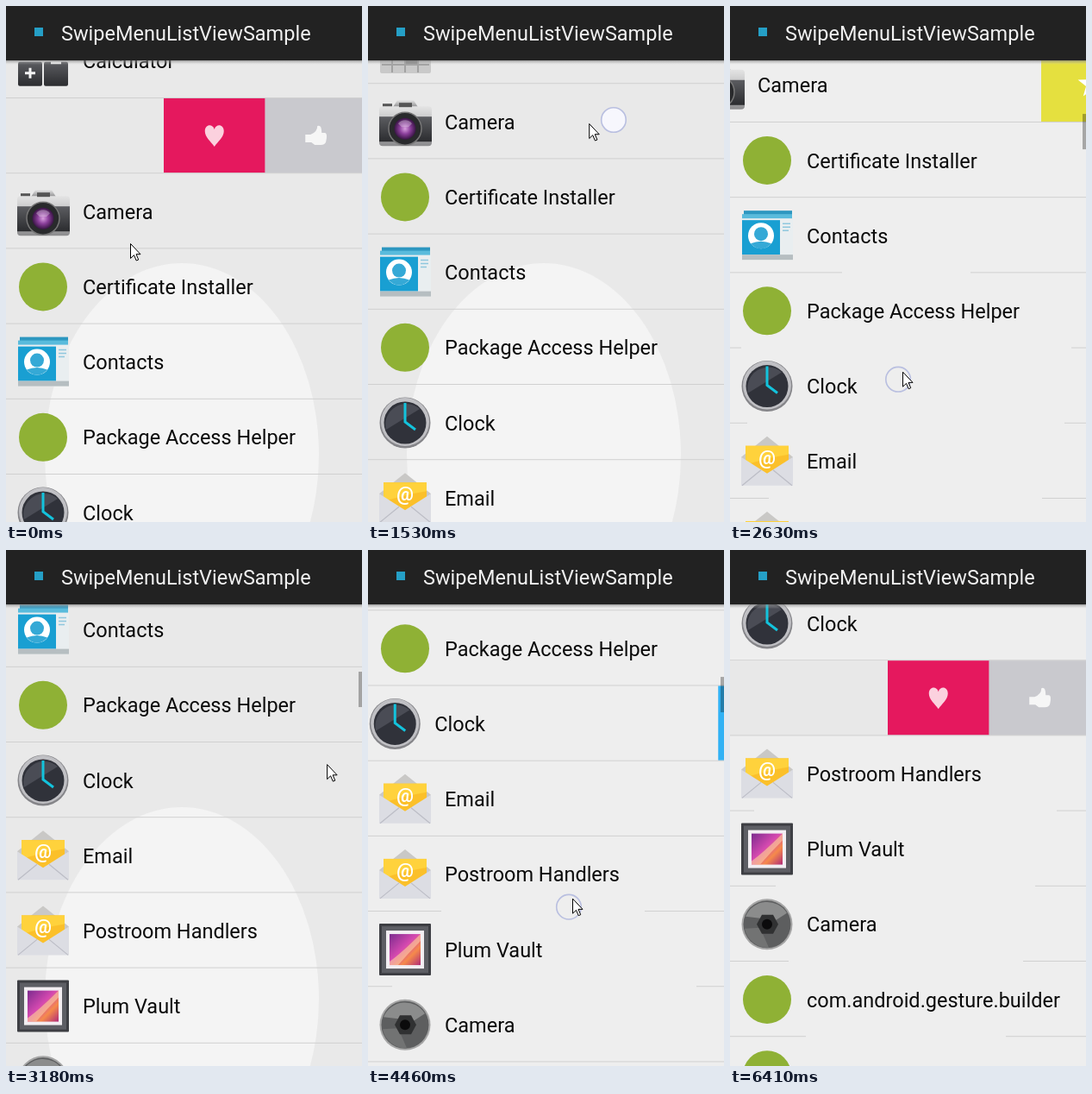
Recreate the animation shown at these times as an HTML page. Size 413 by 598 pixels, loop 7.7 s.

```html
<!DOCTYPE html>
<html lang="en">
<head>
<meta charset="utf-8">
<title>Swipe menu list</title>
<style>
html, body { margin: 0; width: 100%; height: 100%; overflow: hidden; background: #eee; }
svg { display: block; width: 413px; height: 598px; }
text { font-family: Roboto, "Open Sans", sans-serif; font-size: 23.5px; fill: #0b0b0b; }
</style>
</head>
<body>
<svg id="stage" viewBox="0 0 413 598">
  <defs>
    <linearGradient id="shade" x2="0" y2="1"><stop stop-color="#777" stop-opacity=".7"/><stop offset="1" stop-color="#ccc" stop-opacity="0"/></linearGradient>
    <linearGradient id="silver" x2="0" y2="1"><stop stop-color="#e4e4e4"/><stop offset="1" stop-color="#8c8c8e"/></linearGradient>
    <linearGradient id="dark" x2="0" y2="1"><stop stop-color="#5c5d61"/><stop offset="1" stop-color="#2b2c2f"/></linearGradient>
    <linearGradient id="paint" x2="1" y2="1"><stop stop-color="#7c2b8e"/><stop offset=".45" stop-color="#d549b0"/><stop offset=".7" stop-color="#f58a4b"/><stop offset="1" stop-color="#b02a78"/></linearGradient>
    <radialGradient id="violet"><stop stop-color="#d9a0e0"/><stop offset=".5" stop-color="#8b3f9b"/><stop offset="1" stop-color="#3a1546"/></radialGradient>
  </defs>
  <rect id="back" width="413" height="598"/>
  <ellipse id="glow" cx="204" cy="520" rx="159" ry="222" fill="#f4f4f4"/>
  <g id="list"></g>
  <rect id="bar" x="409" width="4" height="41" fill="#000"/>
  <rect y="63" width="413" height="5" fill="url(#shade)"/>
  <rect width="413" height="63" fill="#222"/>
  <rect x="33" y="25" width="10" height="10" fill="#259fc6"/>
  <text x="64" y="40" style="fill:#f1f1f1">SwipeMenuListViewSample</text>
  <circle id="touch" r="14.3" stroke="#b9bfe0" stroke-width="1.6"/>
  <path id="cursor" d="M.5.5V17.5L4.5 13.7 7.2 20 9.7 19 7 12.7H12Z" fill="#fff" stroke="#000"/>
</svg>
<script>
const LOOP = 7700, WIDTH = 418, ITEM = 117.5, OPEN = 2 * ITEM, PITCH = 87.2, TOP = 19.8;
const el = id => document.getElementById(id);

const rect = (x, y, w, h, fill, more = '') =>
  `<rect x="${x}" y="${y}" width="${w}" height="${h}" fill="${fill}" ${more}/>`;
const disc = (x, y, r, fill, more = '') => `<circle cx="${x}" cy="${y}" r="${r}" fill="${fill}" ${more}/>`;
const path = (d, fill, more = '') => `<path d="${d}" fill="${fill}" ${more}/>`;
const line = (d, stroke, width) => path(d, 'none', `stroke="${stroke}" stroke-width="${width}"`);

// App icons, centred on 0,0
const icons = {
  calculator: [[-29, -29], [1, -29], [-29, 1], [1, 1]]
    .map(([x, y]) => rect(x, y, 28, 28, 'url(#dark)', 'rx="2"')).join('') +
    line('M-21 14H-9M-15 8V20M9 2H21', '#f4f4f4', 3),
  calendar: rect(-29, -27, 59, 58, '#c9c9c9', 'rx="2"') + rect(-29, -27, 59, 15, '#4a9fc2') +
    line('M-27 -3H28M-27 9H28M-27 21H28M-15 -12V30M0 -12V30M15 -12V30', '#a2a2a2', 2) +
    rect(1, 10, 13, 10, '#8d8d8d'),
  camera: path('M-14 -17L-9 -25H10L15 -17Z', 'url(#silver)') + rect(-26, -21, 11, 5, '#555') +
    rect(-30, -18, 61, 46, 'url(#silver)', 'rx="4"') + rect(-30, -6, 61, 29, 'url(#dark)') +
    rect(-7, -22, 15, 5, '#555') + disc(0, 8, 19, '#292a2c', 'stroke="#777" stroke-width="1.5"') +
    disc(0, 8, 12.5, 'url(#violet)') + path('M-8 2A10 10 0 0 1 8 2L4 6H-4Z', '#fff', 'opacity=".3"'),
  contacts: rect(-27, -29, 56, 12, '#2d97c0') + rect(-29, -25, 58, 10, '#59bbdc') +
    rect(-29, -20, 59, 48, '#e9eef0') + rect(-29, -18, 44, 40, '#199fd2') + rect(-29, 22, 59, 6, '#b6bec1') +
    disc(-7, 0, 15, '#fff') + disc(-7, -2, 8, '#35a9d6') +
    path('M-19 9Q-7 4 5 9Q0 15 -7 15T-19 9', '#35a9d6') +
    line('M18 -14H27M18 -10H27M18 -6H25', '#8fc7dd', 1.5),
  clock: disc(0, 0, 29.5, '#858589') + disc(0, -1, 28, '#c0c0c4') + disc(0, 0, 24.5, '#30323a') +
    path('M-22 8A24 24 0 0 1 17 -16Z', '#4a4c55') + line('M0 -23V-1L12 8', '#13c3dc', 3),
  mail: path('M-30 -5L0 -29L30 -5V10H-30Z', '#c9c8c6') + rect(-25, -18, 50, 36, '#fbc02a') +
    path('M-25 -18H25V-8Q0 -4 -25 4Z', '#ffd23c') +
    '<text y="3" text-anchor="middle" style="fill:#fff;font-size:22px;font-weight:700">@</text>' +
    path('M-30 -5L0 14L30 -5V28H-30Z', '#dcdde3') + line('M-29 28L-7 10M29 28L7 10', '#bcbdc6', 1.2),
  frame: rect(-30, -30, 60, 60, '#3d3e43', 'rx="1"') + rect(-27, -27, 54, 54, '#5d5e64') +
    rect(-22, -22, 44, 44, '#f2eef2') + rect(-18, -18, 36, 36, 'url(#paint)') +
    path('M-18 14Q-4 4 18 -18V-10Q4 4 -8 18H-18Z', '#ffd0a0', 'opacity=".6"'),
  lens: disc(0, 0, 29.5, '#a5a5a5') + disc(0, 0, 27.5, '#5d5e5f') +
    path('M-25 -9A27 27 0 0 1 23 -13L9 -4L-8 -7Z', '#8b8c8c') + path('M-26 5L-8 4L2 27A27 27 0 0 1 -26 5Z', '#727373') +
    path('M-6 -11H7L13 0L7 11H-6L-12 0Z', '#303132') + disc(0, 0, 6, '#0b0b0c'),
  green: disc(0, 0, 28, '#8fb135')
};

// Menu glyphs, centred on 0,0
const star = Array.from({ length: 10 }, (_, i) => {
  const a = i * Math.PI / 5, r = i % 2 ? 7 : 17;
  return `${(r * Math.sin(a)).toFixed(1)} ${(-r * Math.cos(a)).toFixed(1)}`;
}).join('L');
const glyphs = {
  heart: path('M0 13C-4 7 -11 2 -11 -5C-11 -13 -2 -14 0 -7C2 -14 11 -13 11 -5C11 2 4 7 0 13Z', '#fbd1de'),
  thumb: path('M-12 -1H-6Q2 -4 2 -11Q7 -13 7 -3H11Q14 -2 12 7Q11 11 6 11H-1L-5 8H-12Z', '#f6f6f6'),
  star: path(`M${star}Z`, '#fff'),
  bin: path('M-11 -10H-4V-13H4V-10H11V-7H-11ZM-9 -5H9L8 13H-8Z', '#fff'),
  info: disc(0, 0, 14, '#fff') + rect(-2, -2, 4, 10, '#30b1f5') + disc(0, -6, 2.3, '#30b1f5'),
  share: line('M8 -9L-8 0L8 9', '#f6f6f6', 3) + disc(8, -9, 4.5, '#f6f6f6') + disc(-8, 0, 4.5, '#f6f6f6') + disc(8, 9, 4.5, '#f6f6f6')
};
const menus = [
  [['#e5185e', 'heart'], ['#c9c9ce', 'thumb']],
  [['#e5e03f', 'star'], ['#f93f25', 'bin']],
  [['#30b1f5', 'info'], ['#c9c9ce', 'share']]
];

const apps = [
  ['Calculator', 'calculator'], ['Calendar', 'calendar'], ['Camera', 'camera'],
  ['Certificate Installer', 'green'], ['Contacts', 'contacts'], ['Package Access Helper', 'green'],
  ['Clock', 'clock'], ['Email', 'mail'], ['Postroom Handlers', 'mail'], ['Plum Vault', 'frame'],
  ['Camera', 'lens'], ['com.android.gesture.builder', 'green'], ['', 'green']
];

// Smooth monotone curve through [time, value] points
function track(...keys) {
  const n = keys.length;
  const rise = i => (keys[i + 1][1] - keys[i][1]) / (keys[i + 1][0] - keys[i][0]);
  const slopes = keys.map((_, i) => {
    if (!i || i === n - 1) return 0;
    const a = rise(i - 1), b = rise(i);
    return a * b <= 0 ? 0 : 2 * a * b / (a + b);
  });
  return t => {
    if (t <= keys[0][0]) return keys[0][1];
    if (t >= keys[n - 1][0]) return keys[n - 1][1];
    const i = keys.findIndex(k => k[0] > t) - 1;
    const [t0, v0] = keys[i], [t1, v1] = keys[i + 1];
    const h = t1 - t0, u = (t - t0) / h, w = 1 - u;
    return v0 * (1 + 2 * u) * w * w + v1 * u * u * (3 - 2 * u) +
      h * u * w * (slopes[i] * w - slopes[i + 1] * u);
  };
}

const scroll = track([600, 0], [750, 48], [880, 88], [1040, 104], [2500, 104], [2630, 146],
  [2720, 205], [2850, 288], [3000, 320], [4340, 320], [4460, 385], [4600, 455], [4800, 502]);

const swipes = {
  1: track([560, OPEN], [700, 95], [860, 0]),
  2: track([1530, 0], [1760, 170], [1900, OPEN], [2480, OPEN], [2630, 57.5], [2800, 0]),
  6: track([3300, 0], [3480, 190], [3650, OPEN], [4250, OPEN], [4460, 12], [4540, 0]),
  7: track([5100, 0], [5280, 150], [5360, 195], [5560, OPEN])
};

const handX = track([30, 144], [410, 191], [1060, 192], [1490, 289], [1530, 257], [1760, 90], [1820, 90],
  [2080, 165], [2480, 197], [2630, 200], [2850, 212], [3180, 372], [3270, 378], [3500, 165], [3570, 165],
  [4200, 237], [4460, 237], [4700, 242], [5040, 330], [5060, 328], [5100, 312], [5280, 165], [5380, 126],
  [5460, 126], [6100, 324], [6410, 366]);
const handY = track([30, 275], [410, 398], [570, 398], [750, 342], [880, 302], [1060, 284], [1490, 132],
  [1530, 136], [1800, 140], [2080, 364], [2460, 476], [2500, 472], [2590, 433], [2630, 424], [2720, 365],
  [2870, 262], [3010, 225], [3180, 248], [3270, 256], [3540, 262], [4200, 480], [4300, 472], [4420, 414],
  [4460, 404], [4600, 334], [4720, 290], [5030, 158], [5440, 160], [6100, 326], [6410, 600]);

const presses = [[560, 1080], [1480, 1770], [2480, 2870], [3270, 3510], [4250, 4640], [5050, 5420]];
const scrolls = [[600, 1040], [2500, 3000], [4340, 4800]];

// Dividers break where the backdrop shines through: [from, to, {row: [left, right]}]
const breaks = [
  [2140, 2950, { 4: [130, 279], 5: [13, 396], 6: [20, 388], 7: [45, 362] }],
  [3730, 4520, { 8: [85, 321], 9: [28, 381] }],
  [4520, LOOP, { 8: [28, 379], 9: [53, 354], 10: [68, 340], 11: [88, 320] }]
];

const rows = apps.map(([name, icon], i) => {
  const g = document.createElementNS('http://www.w3.org/2000/svg', 'g');
  const items = menus[(i + 2) % 3].map(([fill, glyph], k) =>
    `<g transform="translate(${k * ITEM})">${rect(0, 0, ITEM + .3, 86.4, fill)}` +
    `<g transform="translate(${ITEM / 2} 43)">${glyphs[glyph]}</g></g>`).join('');
  g.innerHTML = rect(0, 0, WIDTH, 86.4, '#e8e8e8') +
    `<g><g transform="translate(43 44)">${icons[icon]}</g><text x="89" y="52.6">${name}</text></g>` +
    `<g>${items}</g>` + line('', '#d0d0d0', 1);
  el('list').append(g);
  const [under, body, menu, rule] = g.children;
  return { g, under, body, menu, rule };
});

const move = (node, x, y) => node.setAttribute('transform', `translate(${x.toFixed(2)} ${y.toFixed(2)})`);
const within = t => ([from, to]) => t >= from && t < to;

function draw(t) {
  const offset = scroll(t), cut = breaks.find(within(t));
  const glowing = t < 2140 || within(t)([2950, 3730]);
  el('back').setAttribute('fill', glowing ? '#e9e9e9' : '#eee');
  el('glow').setAttribute('visibility', glowing ? 'visible' : 'hidden');

  rows.forEach((row, i) => {
    const open = swipes[i] ? swipes[i](t) : 0;
    const gap = cut && cut[2][i];
    move(row.g, 0, TOP + PITCH * i - offset);
    move(row.body, -open, 0);
    move(row.menu, WIDTH - open, 0);
    row.under.setAttribute('opacity', open > OPEN - 1 ? 1 : 0);
    row.rule.setAttribute('d', gap ? `M0 86.7H${gap[0]}M${gap[1]} 86.7H413` : 'M0 86.7H413');
  });

  const fade = Math.max(...scrolls.map(([from, to]) =>
    t < from ? 0 : Math.min(1, Math.max(0, (to + 470 - t) / 150))));
  el('bar').setAttribute('y', 111.6 + offset * .092);
  el('bar').setAttribute('opacity', .3 * fade);

  const press = presses.find(within(t));
  const touch = el('touch');
  touch.setAttribute('visibility', press ? 'visible' : 'hidden');
  if (press) {
    const late = Math.max(t - 40, press[0]);
    move(touch, handX(late) - 4, handY(late));
    touch.setAttribute('fill', `rgba(248,248,255,${Math.max(0, Math.min(.9, (150 - t + press[0]) / 80))})`);
  }
  move(el('cursor'), handX(t), handY(t));
}

const start = performance.now();
function tick() {
  draw((performance.now() - start) % LOOP);
  requestAnimationFrame(tick);
}
tick();
</script>
</body>
</html>
```
